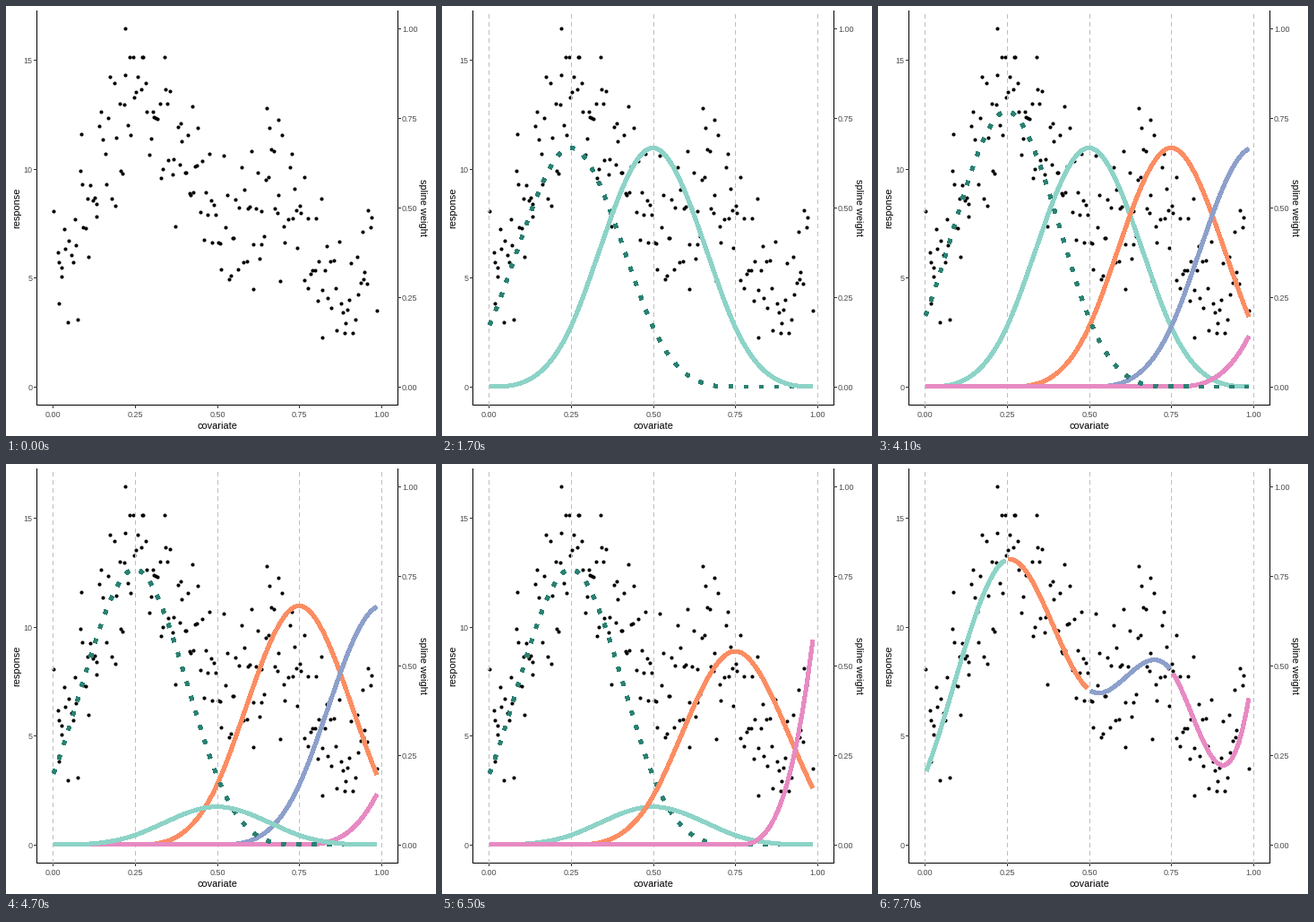
These frames come from a looping animation (480x480 px, 10 s). A matplotlib script:

```python
import numpy as np
import matplotlib.pyplot as plt
from matplotlib.animation import FuncAnimation

SIZE = 480
FRAMES, INTERVAL = 100, 100
HOLD, STEP, LAST = 500, 600, 13

TEAL, ORANGE, BLUE, PINK = "#8DD3C7", "#FC8D62", "#8DA0CB", "#E78AC3"
DARK_TEAL = "#2B8072"
LEFT, RIGHT, TOP, BOTTOM = 34, 437, 5, 445
MAX_RESPONSE = 16.46
KNOTS = np.linspace(0, 1, 5)
KNOT_GAP = KNOTS[1]
CENTERS = KNOTS + KNOT_GAP
WEIGHTS = [1.153, 0.159, 0.81, -0.485, 4.07]
COLORS = [DARK_TEAL, TEAL, ORANGE, BLUE, PINK]
X_MIN, X_MAX = 0.003, 0.986

plt.rcParams["font.family"] = "Liberation Sans"


def px(x):
    return 52 + 367 * x


def py(w):
    return 425 - 400 * w


def basis(x, center):
    """Uniform cubic B-spline bump, 2/3 high at its centre."""
    u = np.abs(x - center) / KNOT_GAP
    inner = 2 / 3 - u**2 + u**3 / 2
    outer = np.clip(2 - u, 0, None) ** 3 / 6
    return np.where(u < 1, inner, outer)


def spline(x):
    return sum(w * basis(x, c) for w, c in zip(WEIGHTS, CENTERS))


fig = plt.figure(figsize=(SIZE / 72, SIZE / 72), dpi=72, facecolor="white")
ax = fig.add_axes([0, 0, 1, 1])
ax.set(xlim=(0, SIZE), ylim=(SIZE, 0))
ax.axis("off")


def draw_points(count=178):
    """Noisy observations around the spline, plus a few outliers."""
    outliers = np.array([
        (0.003, 0.49), (0.019, 0.232), (0.087, 0.705), (0.22, 1.0),
        (0.34, 0.92), (0.425, 0.782), (0.61, 0.272), (0.651, 0.778),
        (0.687, 0.745), (0.82, 0.138), (0.97, 0.472), (0.986, 0.212),
    ])
    rng = np.random.default_rng(4)
    x = 0.01 + 0.96 * (np.arange(count) + rng.random(count)) / count
    noise = np.clip(rng.normal(0, 0.11, count), -0.22, 0.22)
    w = np.clip(spline(x) + noise, 0.15, 0.92)
    x, w = np.append(outliers[:, 0], x), np.append(outliers[:, 1], w)
    ax.scatter(np.round(px(x)), np.round(py(w)), s=4.1**2, color="black",
               linewidths=0, antialiased=False, snap=False, zorder=1)


def draw_axes():
    def line(xs, ys, color="black"):
        ax.plot(xs, ys, color=color, lw=1, antialiased=False, zorder=0,
                solid_capstyle="butt")

    def label(x, y, text, ha):
        ax.text(x, y, text, size=9, color="#4D4D4D", ha=ha, va="baseline")

    def title(x, y, text, angle=0):
        ax.text(x, y, text, size=11, rotation=angle, ha="center", va="center")

    line([LEFT, LEFT], [TOP, BOTTOM])
    line([RIGHT, RIGHT], [TOP, BOTTOM])
    line([LEFT, RIGHT], [BOTTOM, BOTTOM])
    for v in range(0, 20, 5):
        y = py(v / MAX_RESPONSE)
        line([LEFT - 3, LEFT], [y, y], "#333333")
        label(29.5, y + 4, str(v), "right")
    for v in KNOTS:
        x, y = px(v), py(v)
        line([RIGHT, RIGHT + 3], [y, y], "#333333")
        label(442, y + 4, f"{v:.2f}", "left")
        line([x, x], [BOTTOM, BOTTOM + 3], "#333333")
        label(x + 0.5, 459, f"{v:.2f}", "center")

    title(236, 469, "covariate")
    title(12, 225.5, "response", 90)
    title(464.5, 225, "spline weight", -90)


layers = []  # (artist, first step, step it is gone)


def add_layer(x, w, color, start, end, lw=4, style="-"):
    art, = ax.plot(px(x), py(w), color=color, lw=lw, ls=style,
                   antialiased=False, solid_capstyle="butt",
                   dash_capstyle="butt", zorder=2 + start, visible=False)
    layers.append((art, start, end))


def add_basis(i, weight, start, end):
    x = np.linspace(X_MIN, X_MAX, 160)
    w = weight * basis(x, CENTERS[i])
    shown = w >= 0  # values below the scale are dropped
    style = (0, (1.07, 3.2)) if i == 0 else "-"
    add_layer(x[shown], w[shown], COLORS[i], start, end, style=style)


draw_points()
draw_axes()

for knot in KNOTS:
    add_layer(np.full(2, knot), np.array([-0.05, 1.05]), "#BEBEBE",
              1, LAST + 1, lw=1, style=(0, (4, 4)))

for i, weight in enumerate(WEIGHTS):
    add_basis(i, 1, 2 + i, 7 + i)
    add_basis(i, weight, 7 + i, 12 if i == 0 else 13)

# The fitted curve, one colour per knot interval.
for knot, color in zip(KNOTS, COLORS[1:]):
    x = np.linspace(knot + 0.006, min(knot + KNOT_GAP - 0.005, X_MAX), 50)
    x = x.clip(X_MIN)
    add_layer(x, spline(x), color, 12, LAST + 1)


def update(frame):
    t = frame * INTERVAL
    step = 0 if t < HOLD else min(LAST, (t - HOLD) // STEP + 1)
    for art, start, end in layers:
        art.set_visible(start <= step < end)
    return [art for art, _, _ in layers]


anim = FuncAnimation(fig, update, frames=FRAMES, interval=INTERVAL,
                     repeat=True, repeat_delay=0)
plt.show()
```
